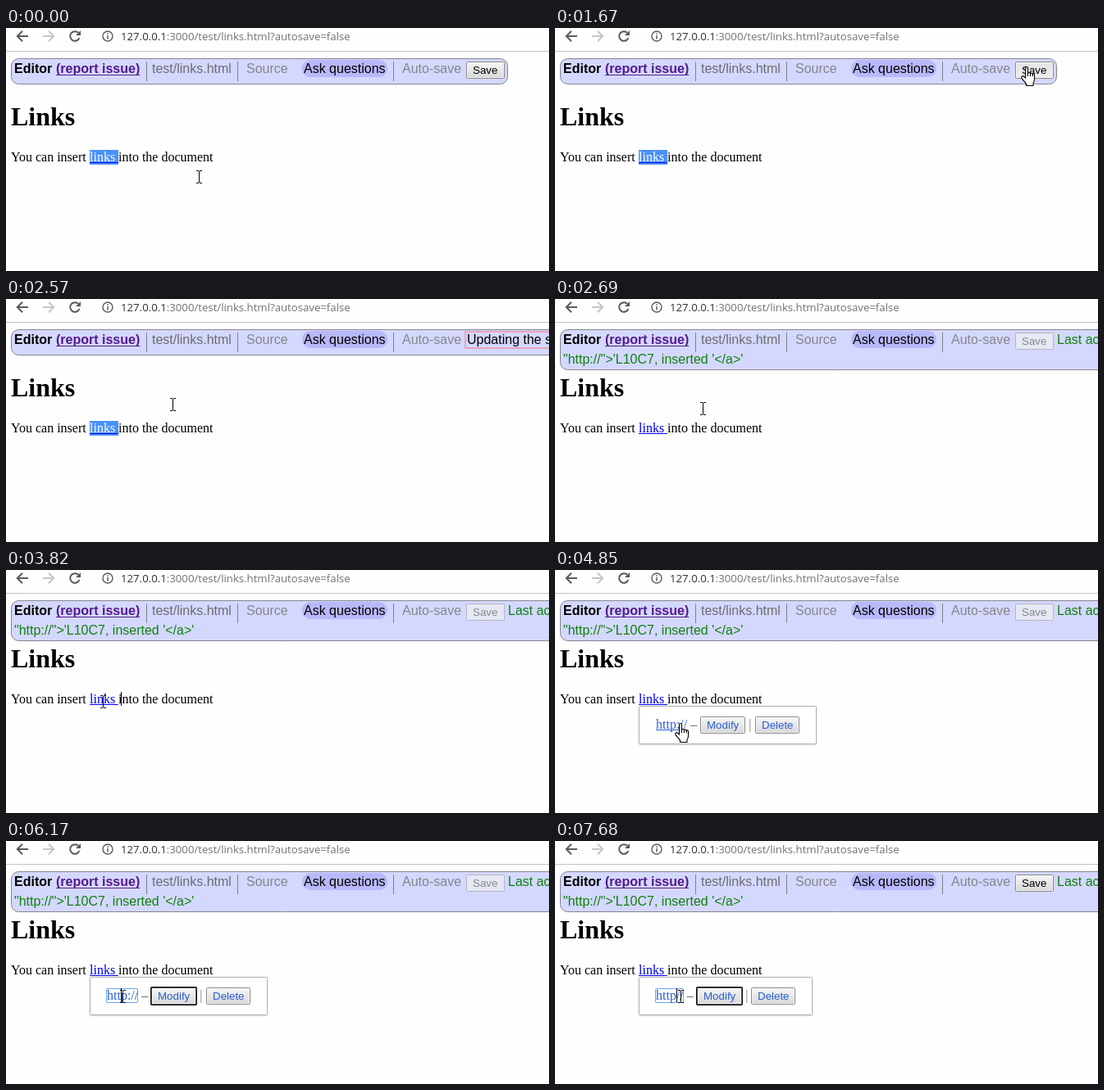
These frames come from a looping animation (662 by 297 pixels, 8 s). An HTML page with a canvas:

```html
<!DOCTYPE html>
<html lang="en">
<head>
<meta charset="utf-8">
<title>Link editing</title>
<style>
html, body { margin: 0; width: 100%; height: 100%; overflow: hidden; background: #fff; }
canvas { display: block; width: 662px; height: 297px; }
</style>
</head>
<body>
<canvas id="stage"></canvas>
<script>
const LOOP = 8000, W = 662, H = 297;
const stage = document.getElementById('stage');
const dpr = window.devicePixelRatio || 1;
stage.width = W * dpr;
stage.height = H * dpr;
const c = stage.getContext('2d');

const SANS = '"Liberation Sans", Arial, sans-serif';
const SERIF = '"Liberation Serif", "Times New Roman", serif';
const UI = '16px ' + SANS, BOLD = 'bold 16px ' + SANS;
const SMALL = '13.333px ' + SANS, BODY = '16px ' + SERIF;
const ADDRESS = '13.2px "Open Sans", "Noto Sans", sans-serif';
const LINK = '#2a5fd0';

// Pointer: start time, shape, left, top
const pointer = [
  [0, 'beam', 232, 174], [940, 'beam', 415, 93], [1080, 'arrow', 535, 61],
  [1240, 'hand', 568, 47], [1910, 'beam', 571, 45], [2060, 'beam', 500, 62],
  [2180, 'beam', 400, 88], [2300, 'beam', 317, 105], [2450, 'beam', 245, 114],
  [2570, 'beam', 200, 121], [2690, 'beam', 177, 126], [2840, 'beam', 160, 138],
  [2960, 'beam', 148, 148], [3110, 'beam', 143, 151], [3260, 'beam', 140, 152],
  [3690, 'beam', 128, 153], [3820, 'beam', 115, 153], [4700, 'arrow', 151, 174],
  [4850, 'hand', 146, 187], [4990, 'arrow', 166, 188], [5110, 'hand', 182, 189],
  [5240, 'hand', 198, 189], [5780, 'beam', 166, 183], [5900, 'beam', 148, 182],
  [6030, 'beam', 139, 182], [6450, 'beam', 144, 182], [6580, 'beam', 148, 182],
  [6730, 'beam', 150, 182]
];

// Text caret: from, to, x, top
const carets = [
  [3390, 3990, 140, 149], [3990, 4550, 118, 149], [5110, 5360, 118, 149],
  [5510, 6030, 123, 180], [6170, 6580, 140, 180], [6580, 7260, 148, 180],
  [7680, 8000, 148, 180]
];

const handPath = new Path2D('M5.5 14V2a1.5 1.5 0 0 1 3 0V8.5q0-1 1.5-1t1.5 1.3q.2-.8 1.4-.8t1.4 1.4q.2-.7 1.1-.7t1.1 1.3V16q0 2-1.5 4.5V23.5H6.5V21Q4 18.5 .8 14.2Q.3 12.2 2 11.6Q3.5 11.8 5.5 14Z');
const handLines = new Path2D('M8.5 8v4M11.5 9v3M14.3 9.5v2.5');
const arrowPath = new Path2D('M.5 .8V16.5L4.1 13L6.7 18.6L8.9 17.6L6.4 12.2H11.3Z');

function text(str, x, y, font, color) {
  c.font = font;
  c.fillStyle = color;
  c.fillText(str, x, y);
  return c.measureText(str).width;
}

function rect(x, y, w, h, color) {
  c.fillStyle = color;
  c.fillRect(x, y, w, h);
}

function box(x, y, w, h, r, fill, line, lw = 1) {
  c.beginPath();
  c.roundRect(x, y, w, h, r);
  if (fill) { c.fillStyle = fill; c.fill(); }
  if (line) { c.strokeStyle = line; c.lineWidth = lw; c.stroke(); }
}

function stroke(path, color, lw) {
  c.strokeStyle = color;
  c.lineWidth = lw;
  c.stroke(path);
}

function button(label, x, y, w, look, color) {
  const fills = { normal: ['#f8f8f8', '#d6d6d6'], hover: ['#fcfcfc', '#e2e2e2'],
    pressed: ['#e4e4e4', '#ececec'], disabled: ['#e6e8f5', '#e6e8f5'] };
  const g = c.createLinearGradient(0, y, 0, y + 21);
  fills[look].forEach((f, i) => g.addColorStop(i, f));
  const off = look === 'disabled';
  box(x + .5, y + .5, w - 1, 20, 1, g, off ? '#b4b6c4' : '#8a8a8a');
  if (!off) box(x + 1.5, y + 1.5, w - 3, 18, 0, null, 'rgba(255,255,255,.6)');
  text(label, x + 8, y + 15, SMALL, off ? '#888' : color);
}

function browserBar() {
  const back = new Path2D('M27 10H14M20 3.8L13.8 10L20 16.2');
  stroke(back, '#5a5a5a', 2);
  c.save();
  c.translate(72, 0);
  c.scale(-1, 1);
  stroke(back, '#c6c6c6', 2);
  c.restore();

  c.beginPath();
  c.arc(84, 10, 5.8, .35, 5.5);
  c.strokeStyle = '#5a5a5a';
  c.lineWidth = 2;
  c.stroke();
  c.fillStyle = '#5a5a5a';
  c.fill(new Path2D('M91 3V9H85Z'));

  c.beginPath();
  c.arc(124, 10, 6, 0, 7);
  c.lineWidth = 1.4;
  c.stroke();
  rect(123.3, 9, 1.5, 4.5, '#5a5a5a');
  rect(123.3, 6.3, 1.5, 1.6, '#5a5a5a');

  const w = text('127.0.0.1', 140, 15, ADDRESS, '#333');
  text(':3000/test/links.html?autosave=false', 140 + w, 15, ADDRESS, '#737373');
  rect(0, 28, W, 1, '#c4c4c4');
}

function editorBar(t) {
  const updating = t >= 1790 && t < 2690, saved = t >= 2690;
  const w = updating || saved ? 800 : 605;
  box(6.5, 37.5, w, saved ? 49 : 31, 9, '#d4d8ff', '#85858f');

  text('Editor', 10, 55, BOLD, '#000');
  const lw = text('(report issue)', 61, 55, BOLD, '#551a8b');
  rect(61, 57, lw, 1, '#551a8b');
  text('test/links.html', 178, 55, UI, '#6c6c70');
  text('Source', 293, 55, UI, '#86868c');
  box(361, 39, 104, 21, 10, '#b9b8fb');
  text('Ask questions', 363, 55, UI, '#000');
  text('Auto-save', 483, 55, UI, '#86868c');
  for (const x of [171, 282, 472]) rect(x, 41, 1, 24, '#808088');

  if (updating) {
    box(560, 40, 300, 20, 0, null, '#e9a3bb', 2);
    text('Updating the s', 562, 55, UI, '#000');
    return;
  }
  const look = t >= 7680 || t < 1240 ? 'normal' : saved ? 'disabled' : t < 1670 ? 'hover' : 'pressed';
  button('Save', 561, 41, 47, look, '#000');
  if (saved) {
    text('Last ac', 612, 55, UI, '#108010');
    text('"http://">\'L10C7, inserted \'</a>\'', 10, 79, UI, '#108010');
  }
}

function page(t) {
  const selected = t < 2690;
  text('Links', 6, 119, 'bold 32px ' + SERIF, '#000');
  text('You can insert ', 6, 163, BODY, '#000');
  if (selected) rect(102, 149, 35, 18, '#4b91fb');
  text('links ', 102, 163, BODY, selected ? '#fff' : '#0000ee');
  rect(102, 164, 35, 1, '#0000ee');
  text('into the document', 137, 163, BODY, '#000');
}

function popup(t) {
  if (t < 3990) return;
  const editing = t >= 5510;
  const url = t >= 7680 ? 'http//' : 'http://';
  c.font = BODY;
  const w = c.measureText(url).width;
  const modify = Math.round(123 + w + 16), del = Math.round(123 + w + 82.6);

  c.save();
  c.shadowColor = 'rgba(0,0,0,.25)';
  c.shadowBlur = 2 * dpr;
  c.shadowOffsetY = dpr;
  box(102.5, 166.5, del + 54 + 20 - 102, 46, 1, '#fff');
  c.restore();
  box(102.5, 166.5, del + 54 + 20 - 102, 46, 1, '#fff', '#b0b0b0');

  if (editing) box(122.5, 180.5, Math.round(w), 17, 1.5, '#fff', '#6ca4f2');
  text(url, 123, 194, BODY, LINK);
  if (t >= 4850 && t < 4990) rect(123, 195, w, 1, LINK);
  text('–', 127 + w, 194, BODY, '#555');
  button('Modify', modify, 179, 55, 'normal', LINK);
  if (editing) box(modify - .25, 178.75, 55.5, 21.5, 1, null, '#111', 1.5);
  text('|', modify + 59.3, 194, BODY, '#777');
  button('Delete', del, 179, 54, 'normal', LINK);
}

const shapes = {
  beam() {
    for (const y of [0, 15]) {
      rect(0, y, 3, 1, '#000');
      rect(4, y, 3, 1, '#000');
    }
    rect(3, 1, 1, 14, '#000');
  },
  arrow() {
    c.fillStyle = '#fff';
    c.fill(arrowPath);
    stroke(arrowPath, '#000', 1);
  },
  hand() {
    c.fillStyle = '#fff';
    c.fill(handPath);
    stroke(handPath, '#000', 1.1);
    stroke(handLines, '#000', 1);
  }
};

function drawPointer(t) {
  const [, shape, x, y] = pointer.findLast(p => p[0] <= t);
  c.save();
  c.translate(x, y);
  shapes[shape]();
  c.restore();
}

function draw(now) {
  const t = now % LOOP;
  c.setTransform(dpr, 0, 0, dpr, 0, 0);
  rect(0, 0, W, H, '#fefefe');
  browserBar();
  editorBar(t);
  page(t);
  popup(t);
  for (const [from, to, x, y] of carets)
    if (t >= from && t < to) rect(x, y, 1, 17, '#000');
  drawPointer(t);
}

const start = performance.now();
function tick() {
  draw(performance.now() - start);
  requestAnimationFrame(tick);
}
tick();
</script>
</body>
</html>
```
